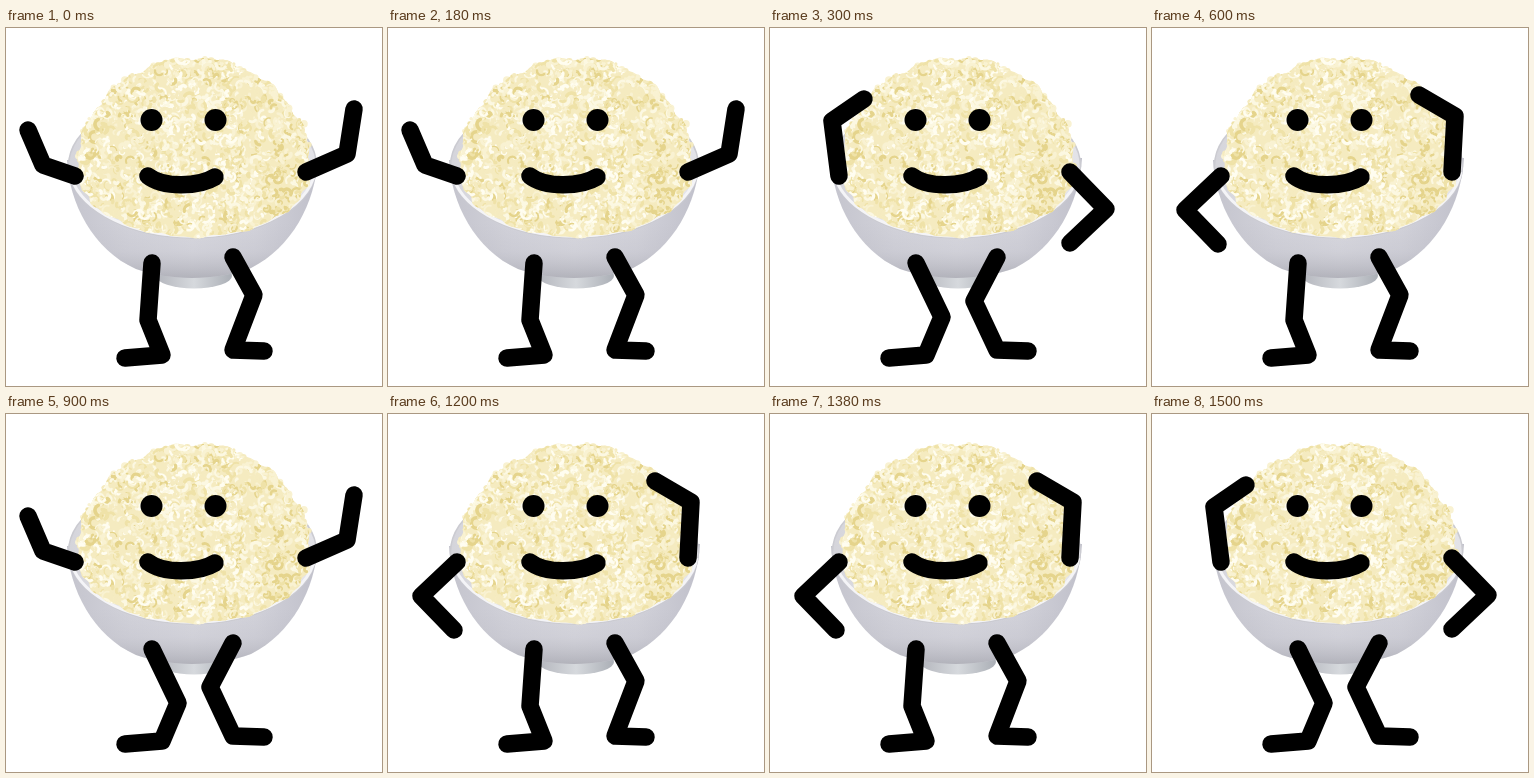
An HTML page with a canvas for the animation above (1800 ms loop, 376 by 358 pixels).

```html
<!DOCTYPE html>
<html lang="en">
<head>
<meta charset="utf-8">
<title>Dancing bowl</title>
<style>
html, body { margin: 0; width: 100%; height: 100%; overflow: hidden; background: #fff; }
canvas { display: block; }
</style>
</head>
<body>
<canvas id="stage" width="376" height="358"></canvas>
<script>
const W = 376, H = 358, STEP = 300, TAU = Math.PI * 2;
const LIMB = 17.5;
const ctx = document.getElementById('stage').getContext('2d');

// Each arm hangs on a fixed shoulder; a pose gives its elbow and hand.
const SHOULDERS = [[69, 148], [300, 144]];
const POSES = {
  cheer: [[[37, 137], [22, 102]], [[341, 126], [348, 81]]],
  left: [[[62, 93], [94, 71]], [[336, 181], [300, 215]]],
  right: [[[33, 182], [66, 216]], [[303, 88], [267, 67]]]
};
const DANCE = ['cheer', 'left', 'right', 'cheer', 'right', 'left'];

// Hips and feet stay put; the knees swing between two places.
const LEGS = [
  { hip: [146, 235], knees: [[142, 292], [172, 289]], ankle: [156, 327], toe: [119, 330] },
  { hip: [227, 229], knees: [[248, 267], [204, 273]], ankle: [227, 322], toe: [258, 323] }
];

function random(seed) {
  return () => {
    seed = (seed * 1664525 + 1013904223) >>> 0;
    return seed / 4294967296;
  };
}

function gradient(c, line, ...colors) {
  const g = c.createLinearGradient(...line);
  colors.forEach((color, i) => g.addColorStop(i / (colors.length - 1), color));
  return g;
}

function disc(c, x, y, r) {
  c.beginPath();
  c.arc(x, y, r, 0, TAU);
  c.fill();
}

function drawBowl(c) {
  c.fillStyle = gradient(c, [150, 0, 226, 0], '#b4b6bd', '#d6d9dd', '#abafb6');
  c.beginPath();
  c.ellipse(188, 248, 38, 12.5, 0, 0, TAU);
  c.fill();

  const body = new Path2D('M61 132 C63 175 87 222 130 241 C163 253 211 253 245 240 C286 219 309 176 312 130 Z');
  c.fillStyle = gradient(c, [61, 0, 312, 0], '#c4c4cd', '#d2d2da', '#d8d8df', '#d2d2da', '#c0c0ca');
  c.fill(body);
  c.fillStyle = gradient(c, [0, 195, 0, 251], '#b0b0ba00', '#b0b0ba30', '#92939c90');
  c.fill(body);

  // Inner wall and bright lip
  c.beginPath();
  c.ellipse(186.5, 138, 124, 72, 0, 0, TAU);
  c.fillStyle = gradient(c, [61, 0, 312, 0], '#d4d4da', '#f2f2f5', '#e2e2e7');
  c.fill();
  c.lineWidth = 1.5;
  c.strokeStyle = '#cbcbd1';
  c.stroke();
  c.beginPath();
  c.ellipse(186.5, 137, 123, 71, 0, 0.1, Math.PI - 0.1);
  c.lineWidth = 3;
  c.strokeStyle = '#f4f4f7';
  c.stroke();
}

// Tall dome above the rim, shallow curve below it, with a ragged outline
function mashEdge(a) {
  const r = 1 + 0.012 * Math.sin(13 * a) + 0.01 * Math.sin(29 * a + 1);
  const tall = Math.sin(a) < 0 ? 112 : 67;
  return [188 + 117 * r * Math.cos(a), 142 + tall * r * Math.sin(a)];
}

function drawMash(c) {
  const rnd = random(71);
  const shades = ['#e5d48c', '#efe2a8', '#f5ebc0', '#f9f2d2', '#fcf8e2', '#fffdf0'];
  const shape = new Path2D();
  for (let a = 0; a < TAU; a += 0.02) shape.lineTo(...mashEdge(a));
  c.fillStyle = shades[2];
  c.fill(shape);

  for (let a = Math.PI; a < TAU; a += 0.045) {
    const [x, y] = mashEdge(a);
    c.fillStyle = shades[1 + Math.floor(rnd() * 3)];
    disc(c, x + rnd() * 6 - 3, y + rnd() * 6, 1.5 + rnd() * 2.5);
  }

  c.save();
  c.clip(shape);
  c.lineCap = 'round';
  for (let i = 0; i < 2300; i++) {
    const x = 68 + rnd() * 242, y = 24 + rnd() * 190, turn = rnd() * TAU;
    const lump = Math.sin(x / 11 + Math.sin(y / 13) * 2) * Math.sin(y / 10 + x / 23);
    const shadow = Math.max(0, x - 225) / 70;
    const tone = Math.floor(0.6 + rnd() * 5.2 + lump * 0.7 - shadow);
    c.strokeStyle = shades[Math.max(0, Math.min(5, tone))];
    c.lineWidth = 1.2 + rnd() * 2.6;
    c.beginPath();
    c.arc(x, y, 1.5 + rnd() * 4, turn, turn + 1.2 + rnd() * 2);
    c.stroke();
  }
  c.restore();
}

function drawFace(c) {
  c.fillStyle = c.strokeStyle = '#000';
  disc(c, 145.5, 92, 11);
  disc(c, 209.5, 92, 11);
  c.lineWidth = LIMB;
  c.lineCap = 'round';
  c.beginPath();
  c.moveTo(142, 148);
  c.bezierCurveTo(157, 160, 193, 159, 209, 149);
  c.stroke();
}

function drawLimb(...joints) {
  ctx.beginPath();
  joints.forEach(p => ctx.lineTo(...p));
  ctx.stroke();
}

const still = document.createElement('canvas');
still.width = W;
still.height = H;
[drawBowl, drawMash, drawFace].forEach(paint => paint(still.getContext('2d')));

function draw(time) {
  const beat = Math.floor(time / STEP) % DANCE.length;
  ctx.fillStyle = '#fff';
  ctx.fillRect(0, 0, W, H);
  ctx.drawImage(still, 0, 0);
  ctx.strokeStyle = '#000';
  ctx.lineWidth = LIMB;
  ctx.lineCap = ctx.lineJoin = 'round';
  POSES[DANCE[beat]].forEach((arm, i) => drawLimb(SHOULDERS[i], ...arm));
  LEGS.forEach(leg => drawLimb(leg.hip, leg.knees[beat % 2], leg.ankle, leg.toe));
}

let start;
function tick(now) {
  if (start === undefined) start = now;
  draw(now - start);
  requestAnimationFrame(tick);
}
draw(0);
requestAnimationFrame(tick);
</script>
</body>
</html>
```
